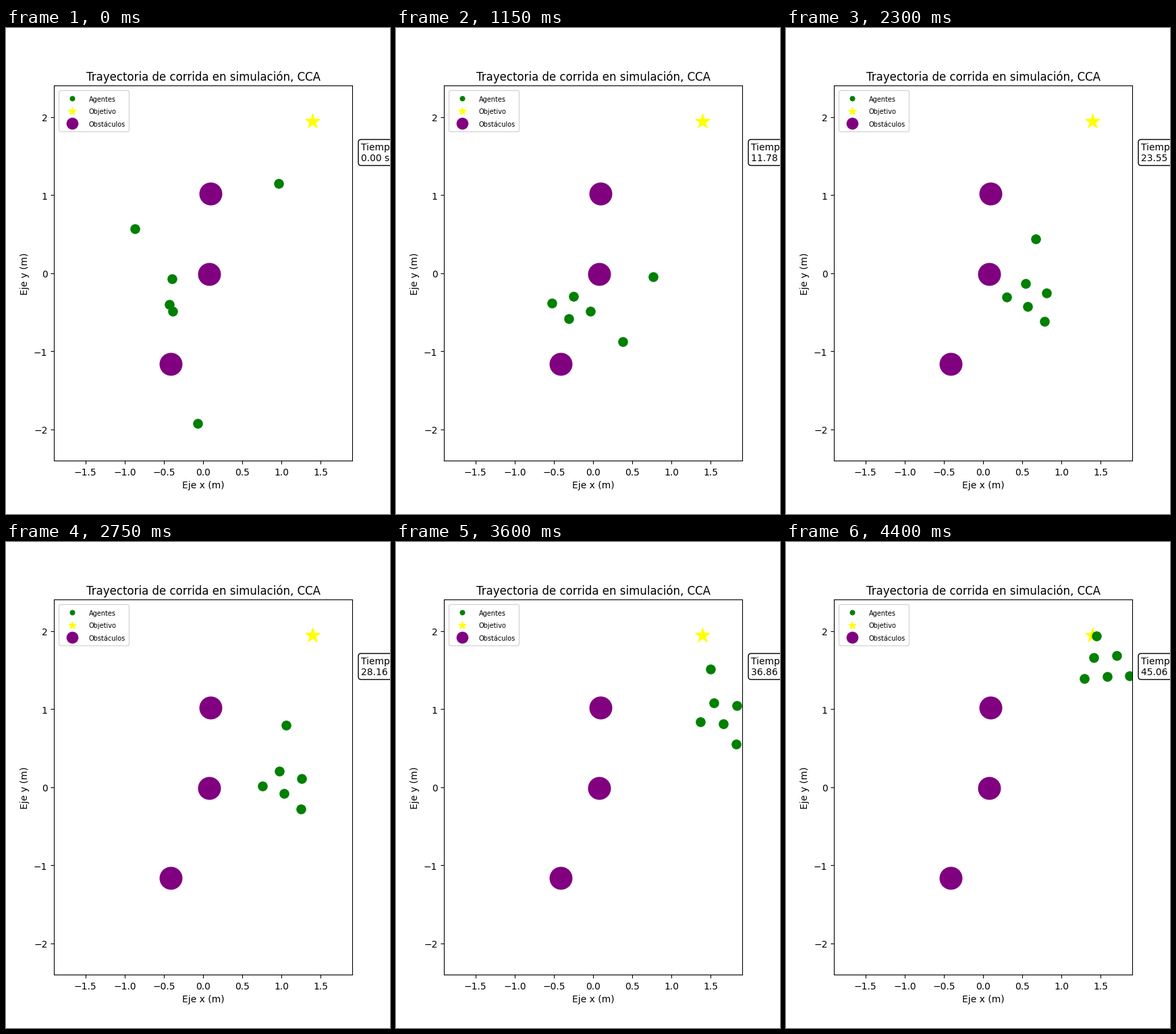
A matplotlib script for the animation above (4450 ms loop, 569 px wide and 719 px high).

```python
import numpy as np
import matplotlib.pyplot as plt
from matplotlib.animation import FuncAnimation
from matplotlib.transforms import Affine2D

W, H, DPI = 569, 719, 100
FULL_W, FULL_H = 569.9999, 719.9999  # layout size before cutting to whole pixels
FRAMES, INTERVAL = 89, 50
STEP = 0.512     # simulated seconds per frame
WALL = 509       # right limit of the arena, px
SPACING = 34     # distance between neighbours in formation, px
JOINED = 23      # frame at which the formation is complete

# Waypoints in stage pixels: scout, centre of the formation, rear agent
KNOTS = np.array([0, 23, 37, 46, 65, 79, 88])
ROUTES = np.array([
    [(404, 230), (381, 368), (354, 367), (370, 312), (462, 229), (462, 154), (460, 139)],
    [(242, 409), (256, 430), (311, 443), (358, 412), (464, 318), (492, 226), (476, 199)],
    [(284, 585), (336, 464), (341, 457), (383, 434), (489, 340), (509, 255), (509, 198)],
], dtype=float)
SLOPES = np.gradient(ROUTES, KNOTS, axis=1)
SLOPES[:, 0] = 0  # start from rest

# The others sit around the centre at these bearings
BEARINGS = np.array([-120, -60, 180])
STARTS = np.array([(246, 371), (247, 419), (191, 297)], dtype=float)

OBSTACLES = np.array([(303, 245), (301, 364), (244, 497)], dtype=float)
GOAL = np.array([(454, 138)], dtype=float)


def to_metres(p):
    """Stage pixels to axes data."""
    return (p - (292.125, 362.6)) / (116.25, -115.5)


def routes(n):
    """Cubic Hermite interpolation of the waypoints."""
    k = min(np.searchsorted(KNOTS, n, side="right") - 1, len(KNOTS) - 2)
    h = KNOTS[k + 1] - KNOTS[k]
    s = (n - KNOTS[k]) / h
    return ((1 + 2 * s) * (1 - s) ** 2 * ROUTES[:, k]
            + s * (1 - s) ** 2 * h * SLOPES[:, k]
            + s * s * (3 - 2 * s) * ROUTES[:, k + 1]
            + s * s * (s - 1) * h * SLOPES[:, k + 1])


def slots(n, centre):
    """Places around the centre; the formation turns at a steady rate."""
    a = np.radians(BEARINGS + 58 - 0.72 * n)
    return centre + SPACING * np.column_stack([np.cos(a), np.sin(a)])


STRAY = STARTS - slots(0, ROUTES[1, 0])


def positions(n):
    lead = routes(n)
    away = max(0, 1 - (n / JOINED) ** 3)
    p = np.vstack([lead, slots(n, lead[1]) + away * STRAY])
    p[:, 0] = np.minimum(p[:, 0], WALL)
    return to_metres(p)


def clock(n):
    return f"Tiempo:\n{n * STEP:.2f} s"


fig, ax = plt.subplots(figsize=(W / DPI, H / DPI), dpi=DPI)
fig.subplots_adjust(left=0.125 * FULL_W / W, right=0.9 * FULL_W / W,
                    bottom=0.11 * FULL_H / H, top=0.88 * FULL_H / H)
ax.set_xlim(-1.9, 1.9)
ax.set_ylim(-2.4, 2.4)
ax.set_title("Trayectoria de corrida en simulación, CCA")
ax.set_xlabel("Eje x (m)")
ax.set_ylabel("Eje y (m)")

goal = ax.scatter(*to_metres(GOAL).T, s=250, marker="*", color="yellow",
                  label="Objetivo")
rocks = ax.scatter(*to_metres(OBSTACLES).T, s=550, color="purple",
                   label="Obstáculos")
agents = ax.scatter(*positions(0).T, s=90, color="green", label="Agentes")

legend = ax.legend(handles=[agents, goal, rocks], loc="upper left",
                   markerscale=0.5)
plt.setp(legend.get_texts(), fontsize=7)

# The frame is a separate artist so that the text can sit one pixel lower
ax.text(1.03, 0.8, clock(0), color="none", transform=ax.transAxes,
        bbox=dict(boxstyle="round", facecolor="white"))
timer = ax.text(1.03, 0.8, clock(0), transform=ax.transAxes)

# The x label follows its tick labels, so it needs no shift of its own
drop = Affine2D().translate(0, -1)
for text in [ax.title, ax.yaxis.label, timer, *legend.get_texts(),
             *ax.get_xticklabels(), *ax.get_yticklabels()]:
    text.set_transform(text.get_transform() + drop)


def update(n):
    agents.set_offsets(positions(n))
    timer.set_text(clock(n))
    return agents, timer


anim = FuncAnimation(fig, update, frames=FRAMES, interval=INTERVAL,
                     repeat=True, repeat_delay=0, blit=False)
plt.show()
```
